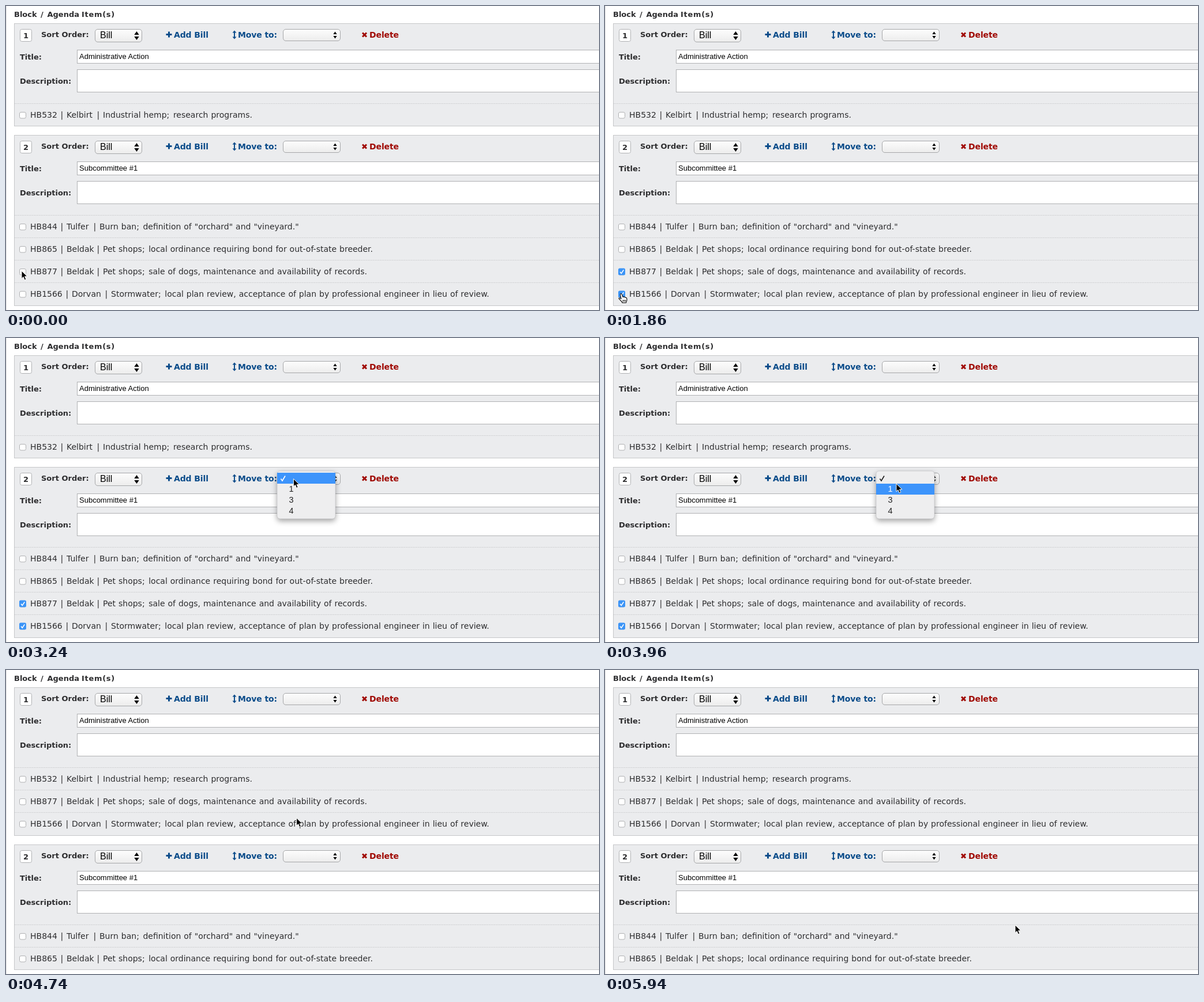
Write an HTML page that moves like this. It is 1028 px wide and 528 px high and loops after 6000 ms.

```html
<!DOCTYPE html>
<html lang="en">
<head>
<meta charset="utf-8">
<title>Agenda items</title>
<style>
html, body { margin: 0; width: 100%; height: 100%; overflow: hidden; background: #fff; }
svg { display: block; }
text { font: 14px "DejaVu Sans", sans-serif; fill: #2d2d2f; white-space: pre; }
.label { font-size: 13px; font-weight: bold; }
.link { font-weight: bold; letter-spacing: -.12px; }
.blue { fill: #0b4c8a; }
.red { fill: #a00b05; }
.field { font: 13px "Liberation Sans", Arial, sans-serif; fill: #000; }
.select { font: 16px "Liberation Sans", Arial, sans-serif; fill: #000; }
.item { font: 14.5px "Liberation Sans", Arial, sans-serif; fill: #222; }
.desc { word-spacing: .5px; }
.panel { fill: #ebecee; stroke: #c6c7c9; }
.box { fill: #fff; stroke: #b0b1b3; }
.rule { stroke: #cfd0d2; stroke-dasharray: 2 1; }
</style>
</head>
<body>
<svg id="stage" width="1028" height="528" viewBox="0 0 1028 528">
  <defs>
    <linearGradient id="button" x2="0" y2="1">
      <stop stop-color="#fdfdfd"/><stop offset="1" stop-color="#ececec"/>
    </linearGradient>
  </defs>
  <rect width="1028" height="528" fill="#fff"/>
  <path d="M.5 0V528" stroke="#dedfe0"/>
  <text class="label" y="19"><tspan x="14">Block</tspan><tspan x="60">/</tspan><tspan x="71.5">Agenda</tspan><tspan x="131" letter-spacing=".7">Item(s)</tspan></text>
</svg>
<script>
const LOOP = 6000, STEP = 60, PITCH = 39;
const FIRST_CHECK = 480, SECOND_CHECK = 1500;
const MENU_OPEN = 3120, MENU_CLICK = 4380, FADE_START = 4460, FADE_END = 4700, MOVED = 4740;
const stage = document.getElementById("stage");

function add(parent, tag, attrs = {}, content = "") {
  const node = document.createElementNS("http://www.w3.org/2000/svg", tag);
  for (const key in attrs) node.setAttribute(key, attrs[key]);
  node.textContent = content;
  return parent.appendChild(node);
}
const write = (parent, cls, x, y, content) => add(parent, "text", { class: cls, x, y }, content);
const box = (parent, x, y, width, height, rx = 0, extra = {}) =>
  add(parent, "rect", { class: "box", x: x + .5, y: y + .5, width, height, rx, ...extra });
const place = (node, x, y) => node.setAttribute("transform", `translate(${x} ${y})`);
const show = (node, on) => node.setAttribute("visibility", on ? "visible" : "hidden");

function selectBox(g, x, y, w, h, arrow) {
  box(g, x, y, w, h, 4.5, { style: "fill:url(#button);stroke:#a6a7a9" });
  const cx = x + w - 8.5, cy = y + h / 2 + .5, half = arrow * .7;
  add(g, "path", {
    d: `M${cx - half} ${cy - 1.5}h${2 * half}l${-half} ${-arrow}ZM${cx - half} ${cy + 1.5}h${2 * half}l${-half} ${arrow}Z`
  });
}

function makePanel(number, title) {
  const g = add(stage, "g");
  const frame = add(g, "rect", { class: "panel", x: 14.5, y: .5, width: 1030 });
  box(g, 24, 10, 20, 21, 3);
  write(g, "label", 30, 26, number);
  write(g, "label", 61, 24, "Sort Order:");
  selectBox(g, 154, 10, 81, 22, 6);
  write(g, "select", 163, 26, "Bill");
  add(g, "path", { d: "M277.5 19.5h10M282.5 14.5v10", stroke: "#0b4c8a", "stroke-width": 3 });
  write(g, "link blue", 291, 25, "Add Bill");
  add(g, "path", { class: "blue", d: "M396 12.5l3.5 4h-2.5v7h2.5l-3.5 4-3.5-4h2.5v-7h-2.5Z" });
  write(g, "link blue", 402, 25, "Move to:");
  selectBox(g, 480, 10, 99, 20, 4.5);
  add(g, "path", { d: "M618 16.5l7 7M625 16.5l-7 7", stroke: "#a00b05", "stroke-width": 3 });
  write(g, "link red", 630, 25, "Delete");
  write(g, "label", 24, 63, "Title:");
  box(g, 123, 46, 920, 23);
  write(g, "field", 127, 62, title);
  write(g, "label", 24, 105, "Description:");
  box(g, 123, 80, 920, 39);
  return { g, frame };
}

function makeRow(bill, nameX, name, descX, subject, detail) {
  const g = add(stage, "g");
  add(g, "path", { class: "rule", d: "M15 .5H1028" });
  box(g, 23, 15, 11, 10.5, 2.5);
  write(g, "", 42, 25, bill);
  write(g, "", nameX - 10.4, 25, "|");
  write(g, "", nameX, 25, name);
  write(g, "", descX - 10.4, 25, "|");
  const desc = write(g, "desc", descX, 25, "");
  add(desc, "tspan", {}, subject + "; ");
  add(desc, "tspan", { dx: 1.6 }, detail);
  const tick = add(g, "g");
  add(tick, "rect", { x: 23, y: 14.5, width: 12, height: 12, rx: 2.5, fill: "#3b94f7" });
  add(tick, "path", { d: "M26 20.8l2.3 2.6 4-6", fill: "none", stroke: "#fff", "stroke-width": 1.6 });
  return { g, tick };
}

const panels = [makePanel("1", "Administrative Action"), makePanel("2", "Subcommittee #1")];
const hemp = makeRow("HB532", 105, "Kelbirt", 168, "Industrial hemp", "research programs.");
const burn = makeRow("HB844", 105, "Tulfer", 162, "Burn ban", 'definition of "orchard" and "vineyard."');
const bond = makeRow("HB865", 105, "Beldak", 168, "Pet shops", "local ordinance requiring bond for out-of-state breeder.");
const dogs = makeRow("HB877", 105, "Beldak", 168, "Pet shops", "sale of dogs, maintenance and availability of records.");
const storm = makeRow("HB1566", 114, "Dorvan", 182, "Stormwater",
  "local plan review, acceptance of plan by professional engineer in lieu of review.");

const menu = add(stage, "g");
add(menu, "rect", {
  x: 470, y: 231, width: 101, height: 83, rx: 5, fill: "#eeeeef", stroke: "#bdbdbf", "stroke-width": .6,
  style: "filter:drop-shadow(0 4px 5px rgba(0,0,0,.35))"
});
const highlight = add(menu, "rect", { x: 470, width: 101, height: 19, fill: "#3d94fb" });
const check = add(menu, "path", { d: "M476.5 244.5l2.5 3.5 5-8.5", fill: "none", "stroke-width": 1.7 });
const items = ["1", "3", "4"].map((label, i) => write(menu, "item", 490.5, 267 + 19 * i, label));

const arrow = add(stage, "path", {
  d: "M0 0V13.5L3.1 10.6 5.2 15.8 7.8 14.7 5.6 9.8H10Z", stroke: "#fff", "stroke-width": 1, "stroke-linejoin": "round"
});
const hand = add(stage, "path", {
  d: "M-1.5 1.5C-2-.5 1-1 1.5 1L3 5.5C4 4.7 5 5 5.3 5.8 6.3 5.2 7.3 5.6 7.6 6.5 8.8 6.2 9.6 7 9.8 8.2 10.4 10.5 9.7 12 9 13.5L8.6 15.5H2L1.5 14C0 12.5-2.5 9.8-3.8 8.4-4.2 7-2.6 6.6-1.6 7.6L0 8.6ZM3.2 10.5v3M5.3 10.5v3M7.4 10.5v3",
  fill: "#fff", stroke: "#000", "stroke-width": 1.1, "stroke-linejoin": "round"
});

// time, x, y
const path = [
  [0, 27, 460], [560, 27, 460], [1020, 29, 509], [1320, 28, 500], [1860, 28, 500],
  [2640, 478, 247], [2700, 479, 246], [3060, 498, 245], [3480, 499, 244],
  [3900, 505, 253], [4380, 504, 257], [5160, 503, 257], [5880, 711, 443], [LOOP, 711, 443]
];
function cursorAt(t) {
  const i = path.findIndex((key, n) => n && t < key[0]);
  const [t0, x0, y0] = path[i - 1], [t1, x1, y1] = path[i];
  const u = (t - t0) / (t1 - t0), k = u * u * (3 - 2 * u);
  return [x0 + (x1 - x0) * k, y0 + (y1 - y0) * k];
}

function layPanel({ g, frame }, top, rows) {
  place(g, 0, top);
  frame.setAttribute("height", Math.round(139 + 39.2 * rows.length));
  rows.forEach((row, i) => place(row.g, 0, top + 139 + PITCH * i));
}

function render(t) {
  const moved = t >= MOVED;
  layPanel(panels[0], 30, moved ? [hemp, dogs, storm] : [hemp]);
  layPanel(panels[1], moved ? 303 : 224, moved ? [burn, bond] : [burn, bond, dogs, storm]);
  for (const row of [hemp, burn, bond]) show(row.tick, false);
  show(dogs.tick, t >= FIRST_CHECK && !moved);
  show(storm.tick, t >= SECOND_CHECK && !moved);

  const [x, y] = cursorAt(t);
  const open = t >= MENU_OPEN && t < FADE_END;
  const onFirst = y > 251;
  const lit = t < MENU_CLICK || t >= MENU_CLICK + STEP;
  menu.setAttribute("display", open ? "inline" : "none");
  menu.setAttribute("opacity", Math.min(1, Math.max(0, (FADE_END - t) / (FADE_END - FADE_START))));
  highlight.setAttribute("y", onFirst ? 253 : 234);
  show(highlight, lit);
  check.setAttribute("stroke", onFirst || !lit ? "#222" : "#fff");
  items[0].style.fill = onFirst && lit ? "#fff" : "#222";

  const pointing = t >= 780 && t < MENU_OPEN;
  place(arrow, x, y);
  place(hand, x, y);
  show(arrow, !pointing);
  show(hand, pointing);
}

const start = performance.now();
function tick() {
  const t = (performance.now() - start) % LOOP;
  render(Math.floor(t / STEP) * STEP);
  requestAnimationFrame(tick);
}
tick();
</script>
</body>
</html>
```
